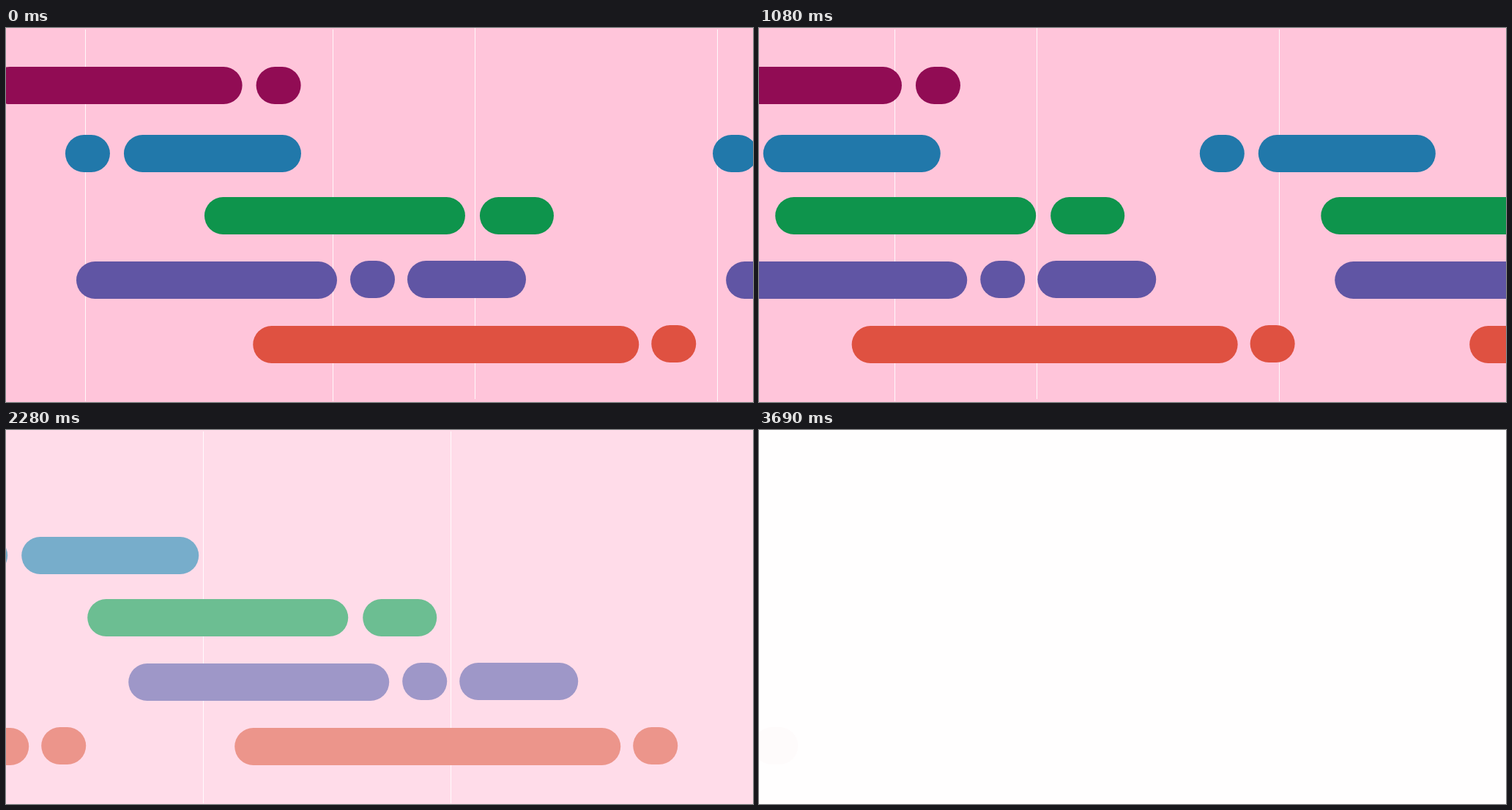
Write an HTML page with a canvas that moves like this. It is 1020 px wide and 511 px high and loops after 3.81 s.

```html
<!DOCTYPE html>
<html lang="en">
<head>
<meta charset="utf-8">
<title>Scrolling bars</title>
<style>
html, body { margin: 0; width: 100%; height: 100%; overflow: hidden; background: #fff; }
canvas { display: block; }
</style>
</head>
<body>
<canvas id="stage" width="1020" height="511"></canvas>
<script>
const ctx = document.getElementById('stage').getContext('2d');
const STEP = 30, LOOP = 3810, LAST = 123;
const TURN = 45;       // step where the slow drift becomes a fast exit with a fade
const FADE = 80;       // steps for the fade to white
const EXIT = 18.38, LINE_EXIT = 14.22;

// pills: [offset, y, width]; groups: x at TURN, drift per step, first drifting step
const rows = [
  { color: '#910c54', pills: [[0, 53, 343], [362, 53, 61]],
    groups: [{ x: -198, drift: 5.55, from: 13 }] },
  { color: '#2178aa', pills: [[0, 146, 61], [80, 146, 242]],
    groups: [{ x: -113, drift: 4.31 }, { x: 511, drift: 10.09 }] },
  { color: '#0e944c', pills: [[0, 231, 356], [376, 231, 101]],
    groups: [{ x: -40, drift: 6.91 }, { x: 681, drift: 9.59 }] },
  { color: '#6055a4', pills: [[0, 319, 356], [374, 318, 61], [452, 318, 162]],
    groups: [{ x: -113.7, drift: 4.66 }, { x: 737, drift: 5.47 }] },
  { color: '#df5141', pills: [[0, 407, 527], [544, 406, 61]],
    groups: [{ x: 74, drift: 5.85 }, { x: 882, drift: 9.8 }] },
];

// vertical lines: [offset, top, bottom]
const lines = [[-338, 2, 510], [0, 2, 510], [194, 0, 507], [525, 2, 510], [863, 2, 510]];
const LINE_X = 184.7, LINE_DRIFT = 8.78, LINE_STOP = 29.75;

function groupX({ x, drift, from = 0 }, step) {
  return step < TURN ? x + drift * (TURN - Math.max(step, from)) : x - EXIT * (step - TURN);
}

function lineX(step) {
  return LINE_X + LINE_DRIFT * Math.max(0, LINE_STOP - step) - LINE_EXIT * Math.max(0, step - TURN);
}

function fill(color, x, y, w, h) {
  ctx.fillStyle = color;
  ctx.fillRect(x, y, w, h);
}

function draw(step) {
  fill('#ffc5da', 0, 0, 1020, 511);
  for (const [dx, top, bottom] of lines)
    fill('rgba(255,255,255,.85)', Math.round(lineX(step) + dx), top, 1, bottom - top);

  for (const { color, pills, groups } of rows) {
    ctx.fillStyle = color;
    for (const group of groups) {
      const x = groupX(group, step);
      for (const [dx, y, w] of pills) {
        ctx.beginPath();
        ctx.roundRect(x + dx, y, w, 51, 25.5);
        ctx.fill();
      }
    }
  }

  const fade = Math.max(0, step - TURN) / FADE;
  fill(`rgba(255,255,255,${fade})`, 0, 0, 1020, 511);
}

const start = performance.now();
function tick(now) {
  const t = Math.max(0, now - start) % LOOP;
  draw(Math.min(LAST, Math.floor(t / STEP)));
  requestAnimationFrame(tick);
}
tick(start);
</script>
</body>
</html>
```
